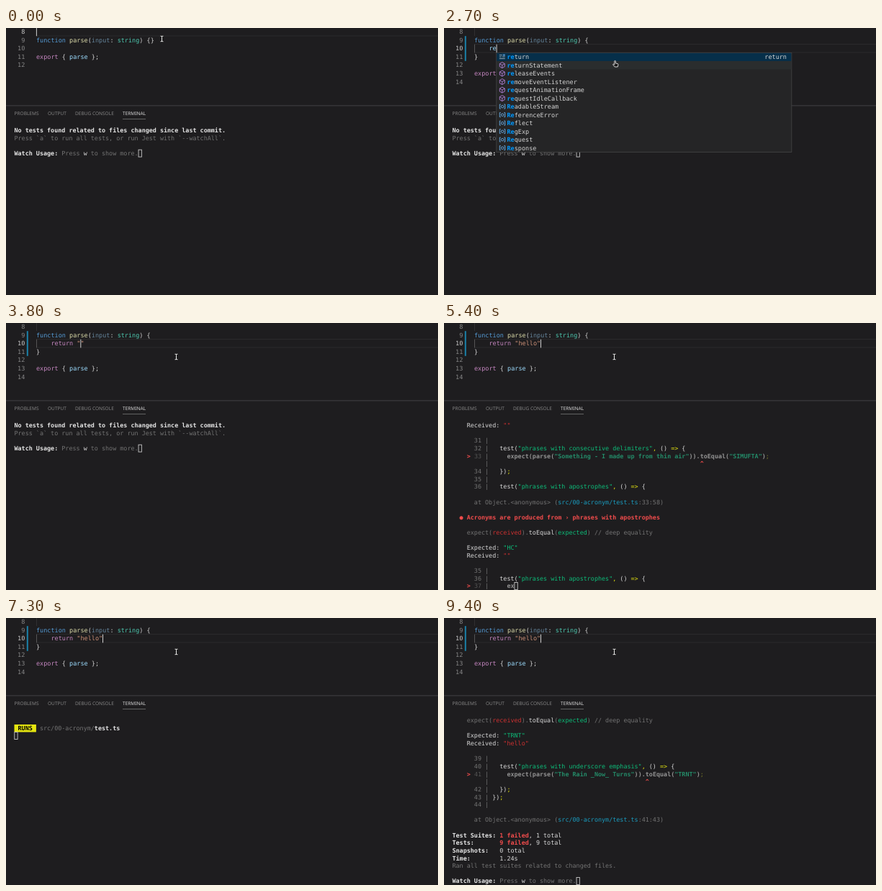
Recreate the animation shown at these times as an HTML page. Size 600 px wide and 371 px high, loop 9500 ms.

```html
<!DOCTYPE html>
<html lang="en">
<head>
<meta charset="utf-8">
<title>Watch mode</title>
<style>
html, body { margin: 0; width: 100%; height: 100%; overflow: hidden; background: #1e1d1f; }
svg { display: block; width: 600px; height: 371px; }
text { white-space: pre; text-rendering: geometricPrecision; font-family: "DejaVu Sans Mono", monospace; }
.ed { font-size: 8.5px; }
.term { font-size: 8.415px; }
.tab { font: 6.55px "Noto Sans", "Open Sans", sans-serif; }
</style>
</head>
<body>
<svg id="stage" viewBox="0 0 600 371" xmlns="http://www.w3.org/2000/svg"></svg>
<script>
const LOOP = 9500, STEP = 100;
const ED = { x: 42, y: 19.6, w: 5.117, h: 11.6 };
const TERM = { x: 11.5, y: 145.2, w: 5.066, h: 10.63 };

// Style keys used as "~k" inside strings; capitals are bold.
const INK = {
  w: '#d9d9d9', W: '#e5e5e5', d: '#737373', n: '#555555', G: '#929292',
  r: '#cd3131', R: '#f14c4c', g: '#0dbc79', T: '#248a68',
  c: '#1a9dc0', y: '#e5e510', o: '#77772a', K: '#000000',
  f: '#569cd6', m: '#dcdcaa', p: '#d4d4d4', i: '#64849a', s: '#4ec9b0',
  e: '#c586c0', v: '#9cdcfe', q: '#ce9178', l: '#858585', a: '#c6c6c6',
  H: '#0097fb'
};

const esc = s => s.replace(/&/g, '&amp;').replace(/</g, '&lt;');
const spans = s => s.split('~').slice(1).map(part => {
  const k = part[0], bold = k < 'a' ? ' font-weight="700"' : '';
  return `<tspan fill="${INK[k]}"${bold}>${esc(part.slice(1))}</tspan>`;
}).join('');
const text = (cls, x, y, s, more = '') =>
  `<text class="${cls}" x="${x}" y="${y}" ${more}>${spans(s)}</text>`;
const rect = (x, y, w, h, fill, more = '') =>
  `<rect x="${x}" y="${y}" width="${w}" height="${h}" fill="${fill}" ${more}/>`;
const path = (d, stroke, width, fill = 'none') =>
  `<path d="${d}" stroke="${stroke}" stroke-width="${width}" fill="${fill}"/>`;
const latest = (table, t) => table.filter(row => row[0] <= t).pop();

// ---------- editor ----------
// time, line, caret column, text on line 10
const KEYS = [
  [0, 8, 0], [600, 9, 31], [1600, 10, 4, ''],
  ...[...'return'].map((_, i) => [2600 + i * 100, 10, 5 + i, (i < 5 ? '~v' : '~e') + 'return'.slice(0, i + 1)]),
  [3200, 10, 11, '~ereturn '],
  ...['', 'h', 'hel', 'hello'].map((s, i) =>
    [i ? 3900 + i * 100 : 3800, 10, 12 + s.length, `~ereturn ~q"${s}"`]),
  [4300, 10, 18, '~ereturn ~q"hello"']
];

function editor(t) {
  const [since, line, col, body] = latest(KEYS, t);
  const open = body !== undefined;
  const top = n => 11.2 + (n - 9) * ED.h;
  const head = '~ffunction ~mparse~p(~iinput~p: ~sstring~p) {';
  const tail = ['', '~eexport ~p{ ~vparse ~p};', ''];
  const rows = open
    ? ['', head, '~p    ' + body, '~p}', ...tail]
    : ['', head + '}', ...tail];
  const hl = Math.round(top(line));
  let out = rect(42.5, hl - .5, 570, 11.5, 'none', 'stroke="#2b2a2c"');
  out += rect(42, 0, .7, 11, '#39393a');
  if (open) out += rect(42, top(10), .7, ED.h, '#686868');
  if (t >= 1800) out += rect(28.8, 11.2, 2, 34.6, '#1b81a8');
  if (line === 9) {
    for (const c of [30, 31])
      out += rect(ED.x + c * ED.w, 12, ED.w, 10.5, 'none', 'stroke="#777" stroke-width=".5"');
  }
  rows.forEach((s, i) => {
    const n = i + 8, y = ED.y + (n - 9) * ED.h;
    out += text('ed', 26.3, y, (n === line ? '~a' : '~l') + n, 'text-anchor="end"');
    out += text('ed', ED.x, y, s);
  });
  if (Math.floor((t - since) / 500) % 2 === 0)
    out += rect(ED.x + col * ED.w - .1, top(line), 1, ED.h, '#d0d0d0');
  return out;
}

// ---------- suggestions ----------
// First letter is the icon: k keyword, f function, v variable
const MATCHES = [
  'k~Hretur~pn', 'f~Hretur~pnStatement', 'f~pis~HRetur~pnStatement',
  'f~Hre~pq~Hu~pes~Ht~pAnimationF~Hr~pame',
  'v~pSpeech~HRe~pcogni~Ht~pion~HR~pes~Hu~plt',
  'v~pSpeech~HRe~pcogni~Ht~pion~HR~pes~Hu~pltList',
  'v~pXMLHttp~HRe~pq~Hu~pes~Ht~pEventTa~Hr~pget',
  'f~pwebkit~HRe~pq~Hu~pes~Ht~pAnimationF~Hr~pame'
];
const EARLY = ['k~Hre~pturn', 'f~Hre~pturnStatement', 'f~Hre~pleaseEvents',
  'f~Hre~pmoveEventListener', 'f~Hre~pquestAnimationFrame', 'f~Hre~pquestIdleCallback',
  'v~HRe~padableStream', 'v~HRe~pferenceError', 'v~HRe~pflect', 'v~HRe~pgExp',
  'v~HRe~pquest', 'v~HRe~psponse'];
// time, left, width, items
const POPUPS = [
  [0], [2700, 72.8, 410, EARLY], [2900, 83, 261, MATCHES],
  [3000, 88.3, 260.5, MATCHES], [3100, 93.4, 260.5, MATCHES.slice(0, 3)], [3200]
];
const ICON = {
  k: path('M0 1.5h4M0 4h3M0 6.5h8M4 4h4', '#a9b4bc', .9) + rect(5, .5, 3, 2, '#5a9bd0'),
  f: path('M4 0L7.5 2V6L4 8L.5 6V2ZM.5 2L4 4L7.5 2M4 4V8', '#b180d7', .9),
  v: path('M2 1H.5V7H2M6.5 1H8V7H6.5M2.5 3.2L4.3 2.3L6.1 3.2V5L4.3 5.9L2.5 5Z', '#6cb0ea', .9)
};

function popup(t) {
  const [, x, w, items] = latest(POPUPS, t);
  if (!items) return '';
  const top = 34.4, h = 11.5, base = 8.6;
  let out = rect(x, top, w, items.length * h, '#252526', 'stroke="#454545" stroke-width=".8"');
  out += rect(x + .5, top + .4, w - 1, h, '#062f4a');
  if (items.length > 1) out += rect(x + .5, top + h, w - 1, h, '#2a2d2e');
  items.forEach((s, i) => {
    const y = top + i * h;
    out += `<g transform="translate(${x + 4} ${y + 1.7})">${ICON[s[0]]}</g>`;
    out += text('ed', x + 14.7, y + base, s.slice(1));
  });
  return out + text('ed', x + w - 6.8, top + base, '~preturn', 'text-anchor="end"');
}

// ---------- terminal ----------
const WATCH = '~WWatch Usage: ~dPress ~ww ~dto show more.';
const num = n => `~d      ${n} | `;
const hit = n => `~R    > ~n${n} ~d|     `;
const test = (n, s) => num(n) + `~w  test(~g"${s}"~y,~w () ~y=>~w {`;
const call = (n, s, want) =>
  hit(n) + `~Gexpect(parse(~T"${s}"~G)).toEqual(~T"${want}"~G)~o;`;
const mark = col => '~d         |' + ' '.repeat(col - 10) + '~R^';
const close = (n, pad) => num(n) + `~w${pad}})~y;`;
const at = pos => `~d      at Object.<anonymous> (~csrc/00-acronym/test.ts~d:${pos})`;
const DEEP = '~d    expect(~rreceived~d).~wtoEqual~d(~gexpected~d) // deep equality';
const want = s => `~w    Expected: ~g"${s}"`;
const got = s => `~w    Received: ~r"${s}"`;

const IDLE = [
  '~WNo tests found related to files changed since last commit.',
  '~dPress `a` to run all tests, or run Jest with `--watchAll`.', '', WATCH
];
const RUNS = ['', '~K RUNS ~d src/00-acronym/~Wtest.ts', ''];
const stream = s => [
  got(s), '', num(31), test(32, 'phrases with consecutive delimiters'),
  call(33, 'Something - I made up from thin air', 'SIMUFTA'), mark(68),
  close(34, '  '), num(35), test(36, 'phrases with apostrophes'), '', at('33:58'), '',
  '~R  ● Acronyms are produced from › phrases with apostrophes', '', DEEP, '',
  want('HC'), got(s), '', num(35), test(36, 'phrases with apostrophes'), hit(37) + '~Gex'
];
const summary = s => [
  DEEP, '', want('TRNT'), got(s), '', num(39),
  test(40, 'phrases with underscore emphasis'),
  call(41, 'The Rain _Now_ Turns', 'TRNT'), mark(53),
  close(42, '  '), close(43, ''), num(44), '', at('41:43'), '',
  '~WTest Suites: ~R1 failed~w, 1 total', '~WTests:       ~R9 failed~w, 9 total',
  '~WSnapshots:   ~w0 total', '~WTime:        ~w1.24s',
  '~dRan all test suites related to changed files.', '', WATCH
];
const SCREENS = [
  [0, IDLE], [4600, RUNS], [5400, stream('')], [5500, summary('')],
  [6000, RUNS], [7400, stream('hello')], [7500, summary('hello')]
];

function terminal(t) {
  const rows = latest(SCREENS, t)[1];
  let out = '';
  if (rows === RUNS) out += rect(TERM.x, 148, 6 * TERM.w, 10.5, '#e5e510');
  rows.forEach((s, i) => out += text('term', TERM.x, TERM.y + i * TERM.h, s));
  const cols = rows[rows.length - 1].replace(/~./g, '').length;
  const y = TERM.y + (rows.length - 1) * TERM.h;
  return out + rect(TERM.x + cols * TERM.w + .3, y - 7.9, 4.3, 9.9, 'none', 'stroke="#c8c8c8" stroke-width=".9"');
}

const TABS = [[11.5, 'PROBLEMS'], [58, 'OUTPUT'], [96, 'DEBUG CONSOLE'], [162, 'TERMINAL']];
const panel = rect(0, 107.4, 600, 1, '#434244') + rect(162, 126, 32, .8, '#747474') +
  TABS.map(([x, s]) => text('tab', x, 121.4, (s === 'TERMINAL' ? '~w' : '~l') + s)).join('');

// ---------- pointer ----------
const MOVES = [[0, 216.5, 15], [500, 205, 17], [700, 205, 17], [1000, 236.5, 47], [LOOP, 236.5, 47]];
const BEAM = 'M-2-3.7H-.7L0-3.2L.7-3.7H2M0-3.2V3.2M-2 3.7H-.7L0 3.2L.7 3.7H2';
const HAND = 'M-1.2-4.2Q-.3-5 .3-4.2V-1L3.2-.4Q4.2 0 3.9 1.3L3.2 4H-.8L-3.3 1Q-3.4 0-2.5 .1L-1.2 1Z';

function pointer(t) {
  const i = MOVES.findIndex(m => m[0] > t);
  const [t0, x0, y0] = MOVES[i - 1], [t1, x1, y1] = MOVES[i];
  const k = (t - t0) / (t1 - t0);
  const hand = Boolean(latest(POPUPS, t)[3]);
  const x = x0 + (x1 - x0) * k + (hand ? 1.5 : 0), y = y0 + (y1 - y0) * k + (hand ? 3 : 0);
  const shape = hand ? path(HAND, '#e8e8e8', .9, '#1a1a1a')
    : path(BEAM, '#111', 2.2) + path(BEAM, '#e8e8e8', 1.1);
  return `<g transform="translate(${x} ${y})">${shape}</g>`;
}

// ---------- clock ----------
const stage = document.getElementById('stage');
let shown = -1;
const start = performance.now();
function tick() {
  const t = Math.floor(((performance.now() - start) % LOOP) / STEP) * STEP;
  if (t !== shown) {
    shown = t;
    stage.innerHTML = editor(t) + panel + terminal(t) + popup(t) + pointer(t);
  }
  requestAnimationFrame(tick);
}
tick();
</script>
</body>
</html>
```
